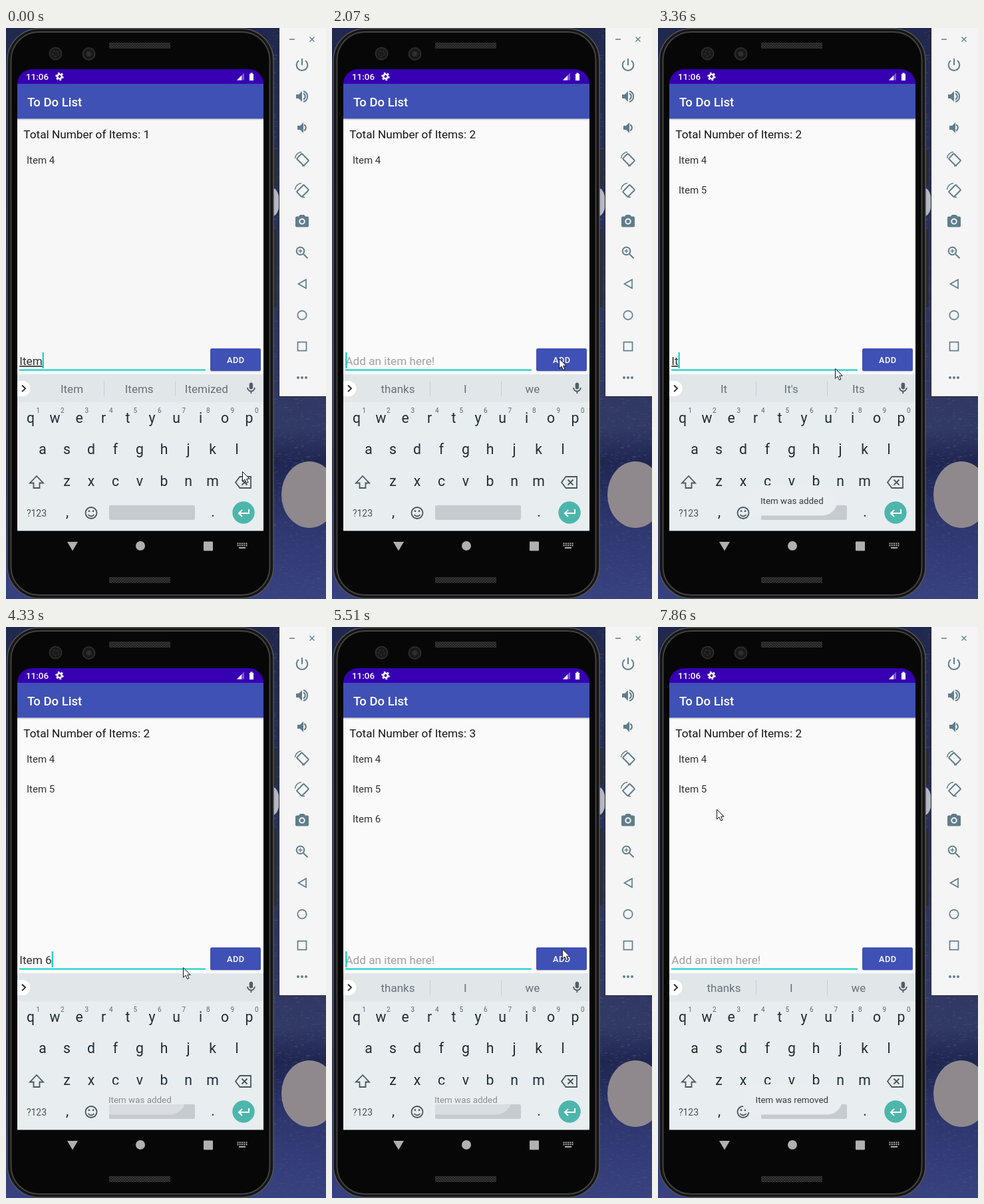
Recreate the animation shown at these times as an HTML page. Size 481x859 px, loop 8000 ms.

```html
<!DOCTYPE html>
<html lang="en">
<head>
<meta charset="utf-8">
<title>To Do List</title>
<style>
html, body { margin: 0; width: 100%; height: 100%; overflow: hidden; background: #232a4d; }
svg { display: block; width: 100%; height: 100%; }
text { font-family: Roboto, sans-serif; white-space: pre; }
.mid { text-anchor: middle; }
.line { fill: none; stroke: #607d8b; stroke-width: 2; }
.key { font-size: 21.2px; fill: #1f2d34; }
.sup { font-size: 10px; fill: #5c686f; }
.sug { font-size: 17px; fill: #66727a; }
.out { fill: none; stroke: #4a565d; stroke-width: 1.8; }
</style>
</head>
<body>
<svg viewBox="0 0 481 859">
  <defs>
    <linearGradient id="night" x2="0" y2="1">
      <stop offset="0" stop-color="#20284d"/>
      <stop offset=".7" stop-color="#313965"/>
      <stop offset=".76" stop-color="#1e2650"/>
      <stop offset=".87" stop-color="#2e376f"/>
      <stop offset="1" stop-color="#384280"/>
    </linearGradient>
    <linearGradient id="shade" x2="0" y2="1">
      <stop offset="0" stop-opacity=".2"/>
      <stop offset="1" stop-opacity="0"/>
    </linearGradient>
    <filter id="grain" x="0" y="0" width="1" height="1">
      <feTurbulence baseFrequency=".12 .3" numOctaves="2" seed="4"/>
      <feColorMatrix values="0 0 0 0 .06  0 0 0 0 .08  0 0 0 0 .2  1.5 0 0 0 -.5"/>
    </filter>
    <pattern id="mesh" width="4" height="4" patternUnits="userSpaceOnUse">
      <path d="M0 0h4v4h-4z" fill="#202020"/><path d="M0 0L4 4M4 0L0 4" stroke="#3a3a3a" stroke-width=".8"/>
    </pattern>
    <clipPath id="screen"><path d="M17 756.5V84a22 22 0 0 1 22-22H365a22 22 0 0 1 22 22V756.5Z"/></clipPath>
    <path id="speaker" d="M0-3H4L9-8V8L4 3H0Z"/>
  </defs>

  <!-- wallpaper -->
  <rect width="481" height="859" fill="url(#night)"/>
  <rect x="400" width="81" height="859" filter="url(#grain)"/>
  <ellipse cx="401" cy="262" rx="10" ry="21" fill="#b4b7c2"/>
  <ellipse cx="456" cy="702" rx="42" ry="50" fill="#8f898e"/>

  <!-- phone -->
  <path d="M404 183v54M404 303v117" stroke="#2c2c2e" stroke-width="5"/>
  <rect x="2" y="1" width="400" height="857" rx="48" fill="#151515" stroke="#555" stroke-width="1.5"/>
  <rect x="7.500" y="6" width="389" height="847" rx="42" fill="#070707" stroke="#424242" stroke-width="2"/>
  <path d="M155 22h92v9h-92zM155 826h92v9h-92z" fill="url(#mesh)"/>
  <g fill="#191919" stroke="#2c2c2c" stroke-width="2">
    <circle cx="74.500" cy="38.500" r="9"/><circle cx="74.500" cy="38.500" r="4" stroke-dasharray="3 2"/>
    <circle cx="124.500" cy="39" r="9"/><circle cx="124.500" cy="39" r="3" fill="#333"/>
  </g>

  <g clip-path="url(#screen)">
    <rect id="page" x="17" y="136" width="370" height="386"/>
    <rect x="17" y="62" width="370" height="22" fill="#3700b3"/>
    <rect x="17" y="84" width="370" height="52.500" fill="#3f51b5"/>
    <rect x="17" y="136.500" width="370" height="3" fill="url(#shade)"/>
    <g fill="#fff" font-weight="500">
      <text x="30" y="78" font-size="13.400">11:06</text>
      <text x="32" y="118" font-size="18.500">To Do List</text>
    </g>
    <g fill="none" stroke="#fff"><circle cx="80.500" cy="73" r="3.300" stroke-width="2.600"/><circle cx="80.500" cy="73" r="5.200" stroke-width="2" pathLength="12" stroke-dasharray="1"/></g>
    <path d="M347 78.500L358 67.500V78.500Z" fill="#fff" opacity=".35"/>
    <path d="M347 78.500L354 71.500V78.500ZM366 69h1.500v-1.500h3V69H372V79H366Z" fill="#fff"/>

    <text id="total" x="26.300" y="166" font-size="17.200" fill="#151515"></text>
    <g id="items" font-size="15" fill="#303030"></g>
    <rect x="20" y="513.500" width="280" height="2" fill="#03d0c5"/>
    <text id="entry" x="20.300" y="507" font-size="17.200"></text>
    <rect id="caret" y="488" width="2" height="24" fill="#03c9bd"/>
    <rect x="307" y="483" width="76" height="34.500" rx="3" opacity=".12"/>
    <rect x="307" y="482" width="76" height="34" rx="2.500" fill="#3f51b5"/>
    <text class="mid" x="345.300" y="504" font-size="12.800" font-weight="500" letter-spacing=".5" fill="#fff">ADD</text>

    <!-- keyboard -->
    <rect x="17" y="521" width="370" height="43" fill="#e1e6e9"/>
    <rect x="17" y="563" width="370" height="194" fill="#e8edf0"/>
    <path d="M17 531h8a11 11 0 0 1 0 23h-8Z" fill="#fff"/>
    <path d="M24 537.500l5 4.800-5 4.800" fill="none" stroke="#222" stroke-width="1.800"/>
    <g id="hints"><path d="M147.500 531v23M254.500 531v23" stroke="#c8ced2"/></g>
    <rect x="365.700" y="533.500" width="5.400" height="10" rx="2.700" fill="#4f5d65"/>
    <path class="out" d="M363 541a5.400 5.400 0 0 0 10.800 0M368.400 546v4"/>
    <g id="keys"></g>
    <path class="out" d="M46 674L36 684.500H41.500V692H50.500V684.500H56Z"/>
    <path class="out" d="M345 683.500L351.500 675H368V692H351.500ZM354.500 679.500l8 8m0-8l-8 8"/>
    <text class="mid" x="46" y="734.500" font-size="14" fill="#47545b">?123</text>
    <g class="out"><circle cx="128" cy="729.500" r="8.500"/><path d="M123.500 732q4.500 5 9 0"/><path d="M123.800 726.700h2.400m3.600 0h2.400" stroke-width="2.400"/></g>
    <rect x="155" y="718" width="129" height="22" rx="2" fill="#c5cbce"/>
    <circle cx="357" cy="729" r="16.700" fill="#4db6ac"/>
    <path d="M365 724v6H350m5-5l-5 5 5 5" fill="none" stroke="#fff" stroke-width="2"/>

    <g id="toast">
      <rect y="688" height="45.500" rx="22.700" fill="#ebeef0"/>
      <text class="mid" x="201.300" y="716" font-size="13.400" fill="#383838"></text>
    </g>
  </g>

  <!-- navigation bar -->
  <g fill="#b0b0b0">
    <path d="M92 773H108L100 786.500Z"/><circle cx="202" cy="779" r="7"/><rect x="297" y="772.500" width="14" height="14" rx="1"/>
    <path d="M347.500 775.500h15m-15 3h15" stroke="#b0b0b0" stroke-width="2" stroke-dasharray="2 1.250"/><path d="M350 781h10v2h-10z"/>
  </g>

  <!-- emulator toolbar -->
  <rect x="410.500" y="-1" width="72" height="555.500" fill="#f5f5f5" stroke="#222"/>
  <g class="line">
    <path d="M426 17h8M456.500 13.500l7 7m0-7l-7 7" stroke-width="1.400"/>
    <path d="M445 46v10M440 49a8.300 8.300 0 1 0 10 0"/>
    <path d="M447 98.500a5 5 0 0 1 0 9M447 95a8.300 8.300 0 0 1 0 16M448 145.500a5 5 0 0 1 0 9"/>
    <g id="turns"></g>
    <circle cx="442.500" cy="335.500" r="5.800"/><path d="M447 340l6.500 6.500"/><path d="M439.500 335.500h6m-3-3v6" stroke-width="1.400"/>
    <g stroke-width="1.700">
      <path d="M451 378.500V391.500L439.500 385Z"/>
      <circle cx="445" cy="432" r="6.700"/>
      <rect x="438.500" y="472.500" width="13" height="13"/>
    </g>
  </g>
  <g fill="#607d8b">
    <use href="#speaker" x="436" y="103"/><use href="#speaker" x="438" y="150"/>
    <path d="M437 283.500h3l2-2.500h6l2 2.500h3a2 2 0 0 1 2 2v12a2 2 0 0 1-2 2h-16a2 2 0 0 1-2-2v-12a2 2 0 0 1 2-2Z"/>
    <circle cx="439" cy="526" r="2"/><circle cx="445" cy="526" r="2"/><circle cx="451" cy="526" r="2"/>
  </g>
  <circle cx="445" cy="291" r="3.700" fill="#607d8b" stroke="#f5f5f5" stroke-width="2"/>

  <path id="mouse" d="M.5 .5V15.200L4 12 6.500 17.500 9 16.400 6.600 11.200H11.200Z" fill="#fff" stroke="#111"/>
</svg>
<script>
const $ = id => document.getElementById(id);
const label = (cls, x, y, text = '') => `<text class="${cls}" x="${x}" y="${y}">${text}</text>`;
const row = (cls, letters, x, y) =>
  [...letters].map((c, i) => label(cls + ' mid', x + i * 36.5, y, c)).join('');

$('keys').innerHTML = row('key', 'qwertyuiop', 37, 594) + row('key', 'asdfghjkl', 55, 641)
  + row('key', 'zxcvbnm', 91.5, 689) + row('key', ',     .', 92, 735) + row('sup', '1234567890', 48.3, 579);
$('hints').innerHTML += [0, 1, 2].map(i => label('sug mid', 99 + i * 101.2, 549)).join('');
$('items').innerHTML = [4, 5, 6].map((n, i) => label('', 31, 204 + i * 45.2, 'Item ' + n)).join('');
$('turns').innerHTML = [-45, 45].map((angle, i) => `<g transform="translate(445 ${197 + i * 47})">
  <rect x="-5.5" y="-7.5" width="11" height="15" rx="1" transform="translate(1 1) rotate(${angle})"/>
  <path d="M-10.500-1A10.500 10.500 0 0 1-1-10.500M0 10.500h4" stroke-width="1.6"/></g>`).join('');

// each edit begins with some text and adds one letter per key time
const edits = [
  { start: -100, text: 'Item 5', kept: 4, keys: [690, 1250] },
  { start: 2070, text: 'Item 6', kept: 0, keys: [3240, 3360, 3510, 3630, 3910, 4210] },
  { start: 5250, text: '', kept: 0, keys: [] }
];
const removed = 7070, listLag = 130, blink = 480, fade = 500;
const toasts = [[2190, 4100], [5250, removed], [removed, 9000]];
const words = {
  '': ['thanks', 'I', 'we'], I: ['I', "I'm", "I'll"], It: ['It', "It's", 'Its'],
  Ite: ['Item', 'Items', 'Itemized'], Item: ['Item', 'Items', 'Itemized'], 'Item ': ['of', 'in', 'is']
};
// pointer stops: time, x, y
const stops = [
  [0, 355, 667], [1270, 355, 667], [1640, 238, 499], [1790, 355, 499], [2070, 341, 497], [2460, 341, 497],
  [2700, 357, 672], [3240, 360, 675], [3360, 266, 512], [4470, 266, 512], [4870, 349, 497], [5510, 347, 485],
  [5670, 155, 340], [5980, 70, 298], [6360, 64, 287], [7720, 64, 287], [7860, 88, 274], [8000, 88, 274]
];

function pointer(t) {
  const i = stops.findIndex(([time]) => time > t);
  const [t0, x0, y0] = stops[i - 1], [t1, x1, y1] = stops[i];
  const k = (t - t0) / (t1 - t0);
  return [x0 + (x1 - x0) * k, y0 + (y1 - y0) * k];
}

const count = t => edits.filter(e => e.start <= t).length - (t >= removed);

function draw(t) {
  const edit = edits.findLast(e => e.start <= t);
  const pressed = edit.keys.filter(k => k <= t);
  const text = edit.text.slice(0, edit.kept + pressed.length);
  const lastEdit = pressed.at(-1) ?? edit.start;

  $('page').setAttribute('fill', t < 2070 ? '#f7f7f7' : '#fafafa');
  $('total').textContent = 'Total Number of Items: ' + count(t);
  const rows = t < removed ? Math.max(1, count(t - listLag)) : count(t);
  [...$('items').children].forEach((el, i) => el.setAttribute('opacity', +(i < rows)));

  const entry = $('entry');
  entry.textContent = text;
  const end = text ? entry.getComputedTextLength() : 0;
  entry.textContent = text || 'Add an item here!';
  entry.setAttribute('fill', text ? '#303030' : '#a0a0a0');
  entry.setAttribute('text-decoration', text && !text.includes(' ') ? 'underline' : 'none');
  $('caret').setAttribute('x', 20.3 + end);
  $('caret').setAttribute('opacity', +((t - lastEdit) % (2 * blink) < blink));

  $('hints').setAttribute('opacity', +(text in words));
  $('hints').querySelectorAll('text').forEach((el, i) => el.textContent = words[text]?.[i] ?? '');

  const [from, to] = toasts.findLast(([from]) => from <= t) ?? [t, t];
  const [pill, note] = $('toast').children;
  note.textContent = t < removed ? 'Item was added' : 'Item was removed';
  const width = note.getComputedTextLength() + 42;
  pill.setAttribute('x', 201.3 - width / 2);
  pill.setAttribute('width', width);
  $('toast').setAttribute('opacity', Math.max(0, Math.min(1, (t - from) / fade, 1 - (t - to) / fade)));
  $('mouse').setAttribute('transform', `translate(${pointer(t)})`);
}

const begin = performance.now();
function tick() {
  draw((performance.now() - begin) % 8000);
  requestAnimationFrame(tick);
}
tick();
</script>
</body>
</html>
```
